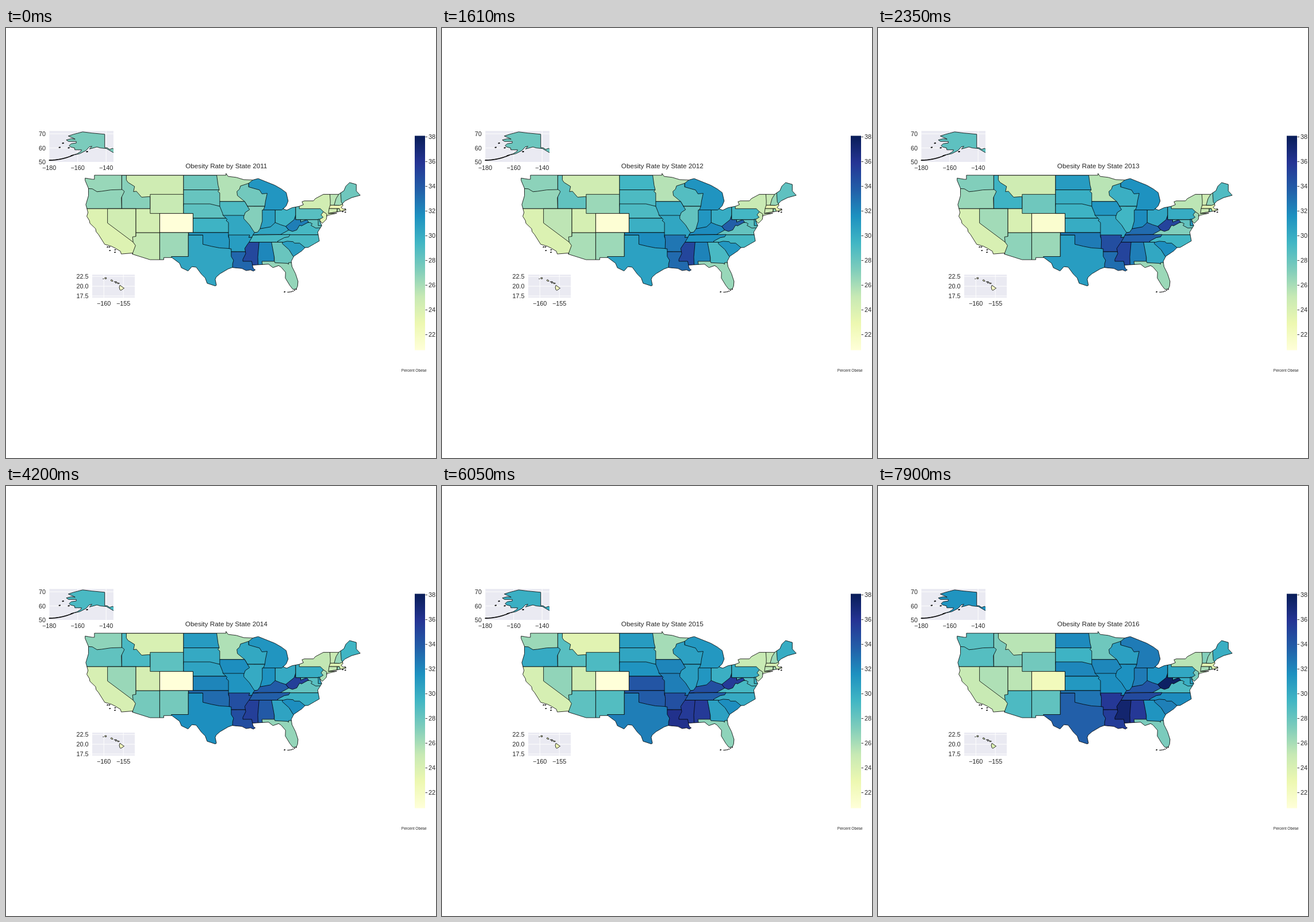
Recreate the animation shown at these times as an HTML page with a canvas. Size 748 by 748 pixels, loop 8 s.

```html
<!DOCTYPE html>
<html lang="en">
<head>
<meta charset="utf-8">
<title>Obesity Rate by State</title>
<style>
html, body { margin: 0; width: 100%; height: 100%; overflow: hidden; background: #fff; }
canvas { display: block; width: 100vw; height: 100vh; }
</style>
</head>
<body>
<canvas id="c" width="748" height="748"></canvas>
<script>
const ctx = document.getElementById('c').getContext('2d');
const INK = '#262626';
const RAMP = ['ffffd9', 'edf8b1', 'c7e9b4', '7fcdbb', '41b6c4', '1d91c0', '225ea8', '253494', '081d58'];
const LOW = 20.74, HIGH = 38.09;
const KEY_YEARS = [0, 2, 4, 5];

// Each view maps (degrees west, degrees north) to pixels.
const view = (x, y, lon, lat, kx, ky = kx) => ({ x: w => x + (lon - w) * kx, y: n => y - (n - lat) * ky, states: [] });
const MAIN = view(267.4, 355.9, 109.05, 37, 8.29, 8.32);
const NORTH = view(124.7, 208.7, 160, 60, 2.475);
const ISLES = view(170.2, 449.2, 160, 20, 6.8);
const NORTH_BOX = [75.5, 179, 111.5, 54], ISLES_BOX = [150, 429, 74, 40];

// Rings are split by "|"; a ring of two corners is a box.
function shape(at, rings) {
  const path = new Path2D();
  for (const ring of rings.split('|')) {
    const pts = ring.split(',').map(p => p.split(' ').map(Number));
    if (pts.length === 2) {
      const [[w, n], [e, s]] = pts;
      pts.splice(1, 1, [e, n], [e, s], [w, s]);
    }
    pts.forEach(([w, n], i) => path[i ? 'lineTo' : 'moveTo'](at.x(w), at.y(n)));
    path.closePath();
  }
  return path;
}

function add(at, rates, rings) {
  at.states.push({ rates, path: shape(at, rings) });
}
// Rates are given for the key years only.
const state = (a, b, c, d, rings) => add(MAIN, [a, b, c, d], rings);

const lakes = '124.7 48.4,123.2 48.15,122.75 48.15,122.75 49,95.15 49,95.15 49.38,94.7 48.75,93 48.55,91.4 48.07,89.5 48,88.4 48.3,84.9 46.9,83.5 46.1,82.5 45.35,82.1 43.6,82.5 42.6,83.15 41.95,82.4 41.68,81.3 42.2,79.76 42.5,78.9 42.83,79.2 43.45,78.7 43.63,76.8 43.63,76.4 44.1,74.7 45,71.5 45';
const east = '71.08 45.3,70.4 45.75,70 46.7,69.2 47.46,67.8 47.07,67.8 45.7,66.97 44.8,68.8 44.3,70.2 43.6,70.7 43.05,70.6 42.65,71 42.3,70.6 41.95,70 41.8,70.2 42.07,69.95 41.7,71.85 41.32,73.65 41,71.9 41.05,73.95 40.58,74.1 39.75,74.9 38.95,75.5 39.5,75.05 38.45,75.9 37.1,75.55 35.25,76.6 34.65,77.9 33.9,78.55 33.86,79.2 33.2,80.9 32.05,81.45 31';
const gulf = '81.3 29.9,80.55 28.4,80.03 26.8,80.12 25.8,80.4 25.2,81.1 25.13,81.75 25.95,82.7 27.5,82.65 28.7,83.6 29.8,84.1 30.1,85.3 29.68,86.2 30.4,89.6 30.2,89.4 29.5,89 29.2,89.4 28.95,90 29.2,90.9 29.05,91.8 29.5,93.85 29.7,94.7 29.4,96.4 28.4,97.2 27.7,97.4 27.2,97.15 26';
const west = '97.4 25.85,99.1 26.4,99.5 27.5,100.3 28.3,101.4 29.77,102.3 29.88,103.1 28.98,104.5 29.65,104.9 30.6,106.5 31.78,108.2 31.78,108.2 31.33,111.07 31.33,114.8 32.5,114.72 32.72,117.12 32.53,117.3 33.1,118.4 33.75,119.2 34.15,120.6 34.55,121.9 36.6,122.4 37.2,122.5 37.8,123.7 38.95,123.8 39.5,124.35 40.4,124.1 41.2,124.55 42.85,124 44.7,124 46.25,124.7 47.9';
const nation = shape(MAIN, [lakes, east, gulf, west].join());

// Every state is clipped by the coast and covers the loose edges of those before it.
// ID, WA, OR, MT, CA, NV, AZ, UT, WY, CO, NM
state(27, 29.6, 28.6, 27.4, '117.03 49,111.05 42');
state(26.5, 27.2, 26.4, 28.6, '125 50,117.03 45.5');
state(26.7, 26.5, 30.1, 28.7, '125 46.25,123.2 46.15,122.2 45.55,121.2 45.65,119.3 45.93,116.92 46,116.46 45.6,117.1 44.3,117.03 42,125 42');
state(24.6, 24.6, 23.6, 25.5, '116.05 49,104.04 49,104.04 44.5,111.5 44.5,112.85 44.4,113.95 45.65,114.55 45.55,114.33 46.65,115.7 47.5,116.05 48');
state(23.8, 24.1, 24.2, 25, '125 42,114 32');
state(24.5, 26.2, 26.7, 25.8, '120 42,114.04 42,114.04 35,114.63 35,120 39');
state(25.1, 26.8, 28.4, 29, '114.04 37,109.05 37,109.05 31,114.8 31,114.72 32.72,114.13 34.3,114.63 35,114.75 36.1,114.04 36.2');
state(24.4, 24.1, 24.5, 25.4, '114.04 42,109.05 37');
state(25, 27.8, 29, 27.7, '111.05 45,104.05 41');
state(20.7, 21.3, 20.2, 22.3, '109.05 41,102.05 37');
state(26.3, 26.4, 28.8, 28.3, '109.05 37,103.04 31');
// TX, ND, SD, NE, KS, OK, MN, MI, WI
state(30.4, 30.9, 32.4, 33.7, '106.6 32,103.04 32,103.04 36.5,93 36.5,93 25,106.6 25');
state(27.8, 31, 31, 31.9, '104.05 49,96 45.94');
state(28.1, 29.9, 30.4, 29.6, '104.05 45.94,96 42.5');
state(28.4, 29.6, 31.4, 32, '104.05 43,98.5 43,96.45 42.5,95 42.5,95 40,102.05 40,102.05 41,104.05 41');
state(29.6, 30, 34.2, 31.2, '102.05 40,94 37');
state(31.1, 32.5, 33.9, 32.8, '103 37,94 37,94 33.65,96.5 33.8,98.2 34.13,100 34.56,100 36.5,103 36.5');
state(25.7, 25.5, 26.1, 27.8, '97.23 50,89 50,89 43.5,96.45 43.5,96.45 45.3,96.85 45.6,96.56 45.93,96.8 46.9');
state(31.3, 31.5, 31.2, 32.5, '89.5 48,90.4 47.3,90.4 43,87 41.5,81 41.5,81 49,88 49');
state(27.7, 29.8, 30.7, 30.7, '90.4 47.3,92.1 46.75,92.3 46.1,92.85 45.6,92.75 44.75,91.22 43.5,90.64 42.5,87 42.5,86.85 43.6,86.5 45.2,87.6 45.1,88.1 45.9,90.4 46.55');
// MO, IA, AR, LA, MS, AL, GA, FL
state(30.3, 30.4, 32.4, 31.7, '95.77 41,88.5 41,88.5 36,94.62 36,94.62 39.1,95.1 39.5,94.9 39.8,95.77 40.6');
state(29, 31.3, 32.1, 32, '96.45 43.5,91.22 43.5,90.64 42.5,90 41.8,91 40.5,91.75 40.6,95.77 40.6,95.85 41,96.45 42.5');
state(30.9, 34.6, 34.5, 35.7, '94.62 36.5,90.15 36.5,90.37 36,89 36,89 33,94.04 33,94.04 33.6,94.48 33.65,94.43 35.4');
state(33.4, 33.1, 36.2, 35.5, '94.04 33,88.5 33,88.5 28,93.8 28,93.75 30.5,93.55 31.2,94.04 32');
state(34.9, 35.1, 35.6, 37.3, '90.3 35,88 35,88 30,89.55 30.1,89.75 31,91.6 31,91.6 31.4,91 32.6,91.2 33.7,90.6 34.6');
state(32, 32.4, 35.6, 35.7, '88.2 35,85 35,85 30,88.4 30,88.47 31.9');
state(28, 30.3, 30.7, 31.4, '85.6 35,80 35,80 30,85 30,85 31.8,85.2 32.9');
state(26.6, 26.4, 26.8, 27.4, '87.6 31,85 31,84.86 30.7,82.2 30.57,82.05 30.36,82 30.73,80 30.73,80 24,87.5 24,87.5 30.3');
// SC, NC, VA, TN, IL, IN, OH, KY
state(30.8, 31.7, 31.7, 32.3, '83.35 34.7,81.9 33.4,81.1 32.1,80 31.5,78 33.5,78 35.3,83.1 35.3');
state(29.1, 29.4, 30.1, 31.8, '84.3 35,83.1 35,82.3 35.2,81.05 35.1,80.8 34.8,79.7 34.8,78.55 33.86,75 33,75 36.55,84.3 36.55');
state(29.2, 27.2, 29.2, 29, '83.7 39.5,75 36.55');
state(29.2, 33.7, 33.8, 34.8, '90.3 35,84.3 35,84.3 35.2,82.9 35.95,82 36.1,81.7 36.6,89.5 36.5,89.7 36');
state(27.1, 29.4, 30.8, 31.6, '90.64 42.5,87 42.5,87.3 41.7,87.3 37,89.15 37,89.5 37.5,90.2 38.6,91.4 39.9,91.4 40.4,91.1 41.2,90.2 41.8');
state(30.8, 31.8, 31.3, 32.5, '87.53 41.74,84.8 41.74,84.8 37.8,88 37.8,87.53 39.4');
state(29.6, 30.4, 29.8, 31.5, '84.82 41.73,83.45 41.73,83.1 42.05,80.52 42.5,80.52 38,84.82 38');
state(30.4, 33.2, 34.6, 34.2, '89.5 36.5,88 36.6,83.7 36.6,81.97 37.53,82.6 38.3,83.7 38.65,84.82 39.1,85.8 38.2,88 37.8,88.5 37.1,89.15 37');
// MD, WV, PA, DE, NJ, NY
state(28.3, 28.3, 28.9, 29.9, '79.48 39.72,75 39.72,75 38,76.3 37.95,77.3 38.5,77.05 38.85,77.5 39.1,79.48 39.1');
state(32.4, 35.1, 35.6, 37.7, '80.52 40.64,80.52 39.72,79.48 39.72,79.48 39.2,78.2 39.7,77.8 39.2,79.3 38.4,79.7 38.55,80.3 37.55,81.2 37.25,81.97 37.53,82.6 38.3,80.85 39.7');
state(28.6, 30, 30, 30.3, '80.52 43,74.5 39.72');
state(28.8, 31.1, 29.7, 30.7, '75.79 39.8,75 38.45');
state(23.7, 26.3, 25.6, 27.4, '75.5 39.75,74.75 40.2,75.2 40.7,74.7 41.36,73.9 41,73.9 38.5,74.95 38.8,75.4 39.4');
state(24.5, 25.4, 25, 25.5, '79.76 45,79.76 42,75.35 42,74.7 41.36,74.02 40.9,74.02 40.4,71.5 40.4,71.5 45.1');
// CT, RI, MA, VT, NH, ME
state(24.5, 25, 25.3, 26, '73.5 42.05,71.8 42.05,71.85 41.32,73.65 41');
state(25.4, 27.3, 26, 26.6, '71.8 42.02,71.12 41.2');
state(22.7, 23.6, 24.3, 23.6, '73.5 42.05,73.27 42.75,70 43,69 41,71.12 41.3,71.35 42.03');
state(25.4, 24.7, 25.1, 27.1, '73.35 45.1,71.4 45.1,71.4 42.74,73.27 42.74,73.25 43.6');
state(26.2, 26.7, 26.3, 26.6, '71.5 45,72.05 44.1,72.45 42.73,71.3 42.7,70.5 43,70.5 45.5,71.5 45.5');
state(27.8, 28.9, 30, 29.9, '71.08 45.3,70.95 43.4,70.7 43.05,70 42.9,66 44,66 48,71 48');

// AK, HI
add(NORTH, [27.4, 28.4, 29.8, 31.4], '141 69.65,150 70.5,156.5 71.3,163 69.6,166.6 68.4,163.5 67.1,161.8 66.2,164.5 66.5,168 65.65,166.5 64.6,161 64.6,161 63.5,164.5 63,166 61.7,165 60.7,162.2 60,162 58.7,157.3 58.7,157.8 57.5,160.5 55.9,164.8 54.6,158.5 56,154.2 58.2,151.8 60.8,150 61.2,151.7 59.3,146.5 60.7,144 60,139.8 59.6,134.5 56.5,133 56,133 58,135.5 59.8,137.5 59,139.2 60.1,141 60.3');
add(ISLES, [21.8, 21.8, 22.7, 23.8], '155.9 20.25,154.8 19.5,155.65 18.93,155.9 19.1,156.05 19.75|156.7 20.95,156 20.75,156.4 20.6|158.25 21.55,157.95 21.7,157.65 21.3,158.1 21.3|159.75 22.2,159.35 21.9|160.2 21.95,160.1 21.85|157.3 21.17,156.75 21.07|157 20.9,156.85 20.78');

const rgb = hex => [0, 2, 4].map(i => parseInt(hex.substr(i, 2), 16));
const lerp = (a, b, k) => a + (b - a) * k;

function shade(v) {
  const p = Math.max(0, Math.min(1, (v - LOW) / (HIGH - LOW))) * 8;
  const i = Math.min(7, Math.floor(p));
  const a = rgb(RAMP[i]), b = rgb(RAMP[i + 1]);
  return `rgb(${a.map((c, k) => Math.round(lerp(c, b[k], p - i)))})`;
}

function rateAt(rates, year) {
  const i = Math.max(0, KEY_YEARS.findIndex(y => y >= year) - 1);
  const from = KEY_YEARS[i], to = KEY_YEARS[i + 1];
  return lerp(rates[i], rates[i + 1], (year - from) / (to - from));
}

function text(str, x, y, size, align) {
  ctx.font = `${size}px "Liberation Sans", Arial, sans-serif`;
  ctx.textAlign = align;
  ctx.fillStyle = INK;
  ctx.fillText(str, x, y);
}

function line(x1, y1, x2, y2, color) {
  ctx.strokeStyle = color;
  ctx.lineWidth = 0.9;
  ctx.beginPath();
  ctx.moveTo(x1, y1);
  ctx.lineTo(x2, y2);
  ctx.stroke();
}

function speck(at, w, n, r = 1.2) {
  ctx.fillStyle = '#000';
  ctx.beginPath();
  ctx.ellipse(at.x(w), at.y(n), r, r * 0.6, -0.2, 0, 7);
  ctx.fill();
}

function inset(at, [x, y, w, h], lons, lats, digits, labelY) {
  ctx.fillStyle = '#eaeaf2';
  ctx.fillRect(x, y, w, h);
  for (const lon of lons) {
    const gx = at.x(lon);
    if (gx > x) line(gx, y, gx, y + h, '#fff');
    text('\u2212' + lon, gx, labelY, 10.8, 'center');
  }
  for (const lat of lats) {
    const gy = at.y(lat);
    line(x, gy, x + w, gy, '#fff');
    text(lat.toFixed(digits), x - 6.5, gy + 4, 10.8, 'right');
  }
}

function paint(at, year, clip) {
  ctx.save();
  if (clip) ctx.clip(clip);
  ctx.strokeStyle = '#000';
  ctx.lineWidth = 0.8;
  for (const s of at.states) {
    ctx.fillStyle = shade(rateAt(s.rates, year));
    ctx.fill(s.path);
    ctx.stroke(s.path);
  }
  ctx.restore();
}

function islets() {
  for (let w = 163.5; w < 180; w += 0.9) speck(NORTH, w, 51.4 + 3.2 * ((180 - w) / 16) ** 2, 1.5);
  for (let k = 0; k <= 1; k += 0.2) speck(MAIN, 82.1 - 1.7 * k, 24.55 + 0.6 * k * k);
  for (const [w, n] of [[170.3, 63.4], [172.7, 60.4], [166.3, 60.1], [153.4, 57.4]]) speck(NORTH, w, n, 1.8);
  for (const [w, n] of [[120, 34], [119.6, 34], [118.4, 33.4], [119.5, 33.25], [118.45, 32.9], [82.85, 24.6], [70.65, 41.4], [70.1, 41.27]]) speck(MAIN, w, n, 1.5);
}

function colorbar() {
  const top = 187.5, bottom = 560.5;
  const fill = ctx.createLinearGradient(0, bottom, 0, top);
  RAMP.forEach((c, i) => fill.addColorStop(i / 8, '#' + c));
  ctx.fillStyle = fill;
  ctx.fillRect(711, top, 18, bottom - top);
  for (let v = 22; v <= 38; v += 2) {
    const y = lerp(bottom, top, (v - LOW) / (HIGH - LOW));
    line(729.5, y, 733, y, INK);
    text(v, 735, y + 4, 10.8, 'left');
  }
  text('Percent Obese', 709.8, 598, 6.6, 'center');
}

function draw(year) {
  ctx.fillStyle = '#fff';
  ctx.fillRect(0, 0, 748, 748);
  ctx.lineJoin = 'round';
  inset(NORTH, NORTH_BOX, [180, 160, 140], [70, 60, 50], 0, 247);
  inset(ISLES, ISLES_BOX, [160, 155], [22.5, 20, 17.5], 1, 483);
  const frame = new Path2D();
  frame.rect(...NORTH_BOX);
  paint(NORTH, year, frame);
  paint(ISLES, year);
  paint(MAIN, year, nation);
  ctx.strokeStyle = '#000';
  ctx.lineWidth = 0.8;
  ctx.stroke(nation);
  islets();
  text('Obesity Rate by State ' + (2011 + year), 383.3, 244, 11.7, 'center');
  colorbar();
}

let shown = -1;
function tick() {
  const t = performance.now() % 8000;
  const year = t < 500 ? 0 : 1 + Math.floor((t - 500) / 1850);
  if (year !== shown) draw(shown = year);
  requestAnimationFrame(tick);
}
tick();
</script>
</body>
</html>
```
